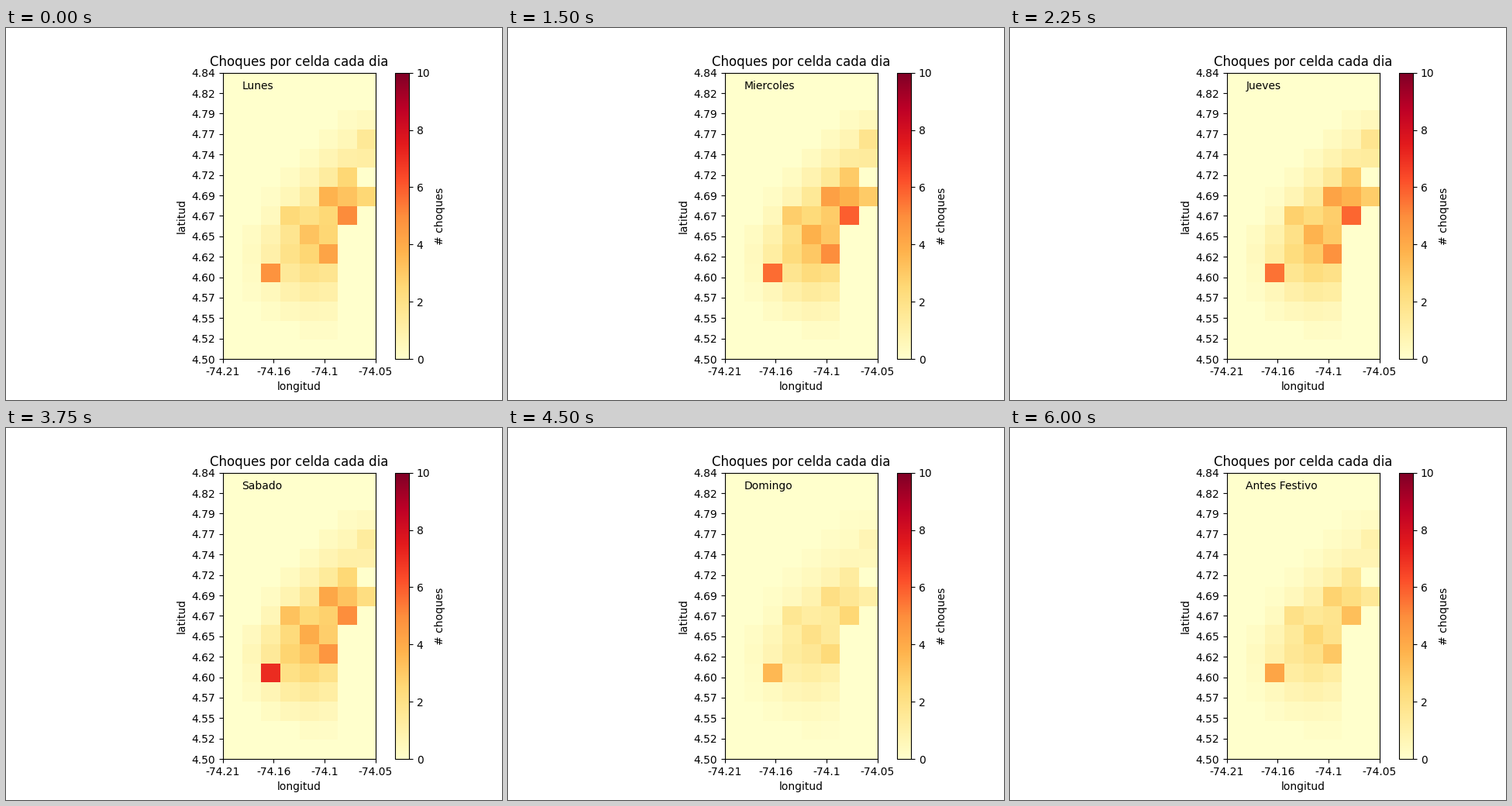
These frames come from a looping animation (640x480 px, 6750 ms). A matplotlib script:

```python
import numpy as np
import matplotlib.pyplot as plt
from matplotlib.animation import FuncAnimation

plt.rcParams["font.family"] = "DejaVu Sans"

ROWS, COLS = 15, 8

# day, crash level, change of that level per column eastwards
DAYS = [
    ("Lunes", 1.0, 0),
    ("Martes", 1.23, 0),
    ("Miercoles", 1.18, 0),
    ("Jueves", 1.15, 0),
    ("Viernes", 1.2, -0.03),
    ("Sabado", 1.23, -0.12),
    ("Domingo", 0.62, -0.06),
    ("Festivo", 0.62, -0.06),
    ("Antes Festivo", 0.77, -0.05),
]

# (row, column): mean crashes where a cell stands out from its surroundings
KEY_CELLS = {
    (3, 7): 1.5, (5, 6): 2.5, (5, 7): 0, (6, 5): 3.7, (6, 6): 3.2,
    (6, 7): 2.5, (7, 3): 2.4, (7, 6): 5.0, (8, 4): 3.2, (9, 5): 4.2,
    (10, 2): 4.8,
}


def bell(x, width):
    return np.exp(-0.5 * (x / width) ** 2)


def city_map():
    """Ridge of crashes leaning north-east, cut off at the eastern edge."""
    row, col = np.mgrid[:ROWS, :COLS]
    ridge = np.maximum(4.2, 4.5 + 0.55 * (8 - row))
    spread = np.where(row < 8.4, 3.4, 2.0)
    city = 2.7 * bell(row - 8.4, spread) * bell(col - ridge, 1.6)
    east_edge = np.clip(13 - row, 5, 7)
    city[(col > east_edge) | (row < 2) | (city < 0.15)] = 0
    for cell, value in KEY_CELLS.items():
        city[cell] = value
    return city


CITY = city_map()


def day_grid(level, tilt):
    return CITY * (level + tilt * (np.arange(COLS) - 4))


fig, ax = plt.subplots(figsize=(6.4, 4.8), dpi=100)
image = ax.imshow(CITY, cmap="YlOrRd", vmin=0, vmax=10,
                  interpolation="nearest")
fig.colorbar(image, ax=ax, label="# choques")
label = ax.text(0.5, 0.36, "")

ax.set_title("Choques por celda cada dia")
ax.set_xlabel("longitud")
ax.set_ylabel("latitud")
ax.set_xticks(np.linspace(-0.5, COLS - 0.5, 4),
              ["-74.21", "-74.16", "-74.1", "-74.05"])
ax.set_yticks(np.linspace(ROWS - 0.5, -0.5, 15),
              [f"{lat:.2f}" for lat in np.linspace(4.5, 4.84, 15)])


def update(i):
    name, level, tilt = DAYS[i]
    image.set_data(day_grid(level, tilt))
    label.set_text(name)
    return image, label


anim = FuncAnimation(fig, update, frames=len(DAYS), interval=750,
                     repeat=True, repeat_delay=0)
plt.show()
```
